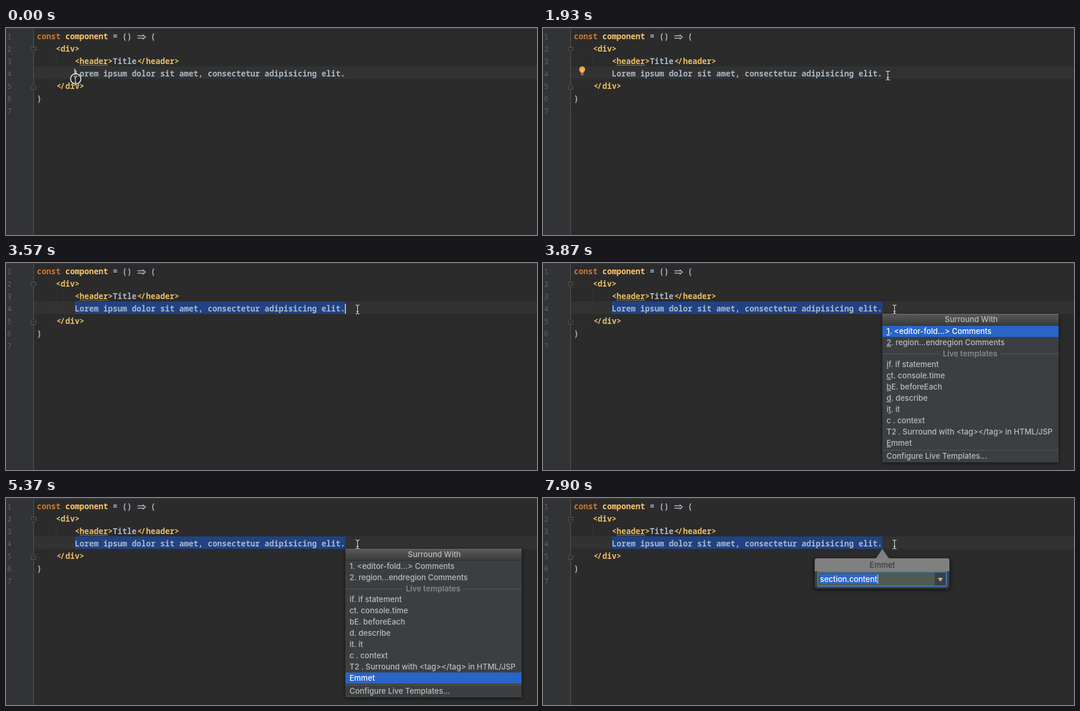
Animation of 895 by 350 pixels, one loop 8000 ms. Source, as an HTML page:

```html
<!DOCTYPE html>
<html lang="en">
<head>
<meta charset="utf-8">
<title>Surround with Emmet</title>
<style>
html, body { margin: 0; width: 100%; height: 100%; overflow: hidden; background: #2b2b2b; }
svg { display: block; }
text { white-space: pre; }
.code { font: 600 13.333px "Noto Sans Mono", monospace; font-variant-ligatures: none; }
.code .number { font-size: 12px; font-weight: 400; }
.code .keyword { font-weight: 800; }
.ui { font: 500 12.95px Inter, sans-serif; }
.keys .key { text-decoration: underline; }
</style>
</head>
<body>
<svg id="stage" width="895" height="350" viewBox="0 0 895 350"></svg>
<script>
const LOOP = 8000, CHAR = 8, LEFT = 52;
const PLAIN = '#a9b7c6', TAG = '#e8bf6a', NAME = '#ffc66d', KEYWORD = '#cc7832';
const $ = id => document.getElementById(id);
const esc = s => s.replace(/&/g, '&amp;').replace(/</g, '&lt;');
const rect = (x, y, w, h, fill, more = '') =>
  `<rect x="${x}" y="${y}" width="${w}" height="${h}" fill="${fill}" ${more}/>`;
const path = (d, stroke, fill = 'none', more = '') =>
  `<path d="${d}" stroke="${stroke}" fill="${fill}" ${more}/>`;
const label = (x, y, s, fill, more = '') => `<text x="${x}" y="${y}" fill="${fill}" ${more}>${esc(s)}</text>`;
const base = row => 19 + 21 * row;
const code = (col, row, s, fill = PLAIN, more = '') => label(LEFT + col * CHAR, base(row), s, fill, more);

// "</" is drawn tightened, like the editor's ligature
const closeTag = (col, row, name) =>
  code(col + .15, row, '<', TAG) + code(col + .9, row, '/', TAG) + code(col + 2, row, name + '>', TAG);

const lorem = 'Lorem ipsum dolor sit amet, consectetur adipisicing elit.';
const lines = ['const component = () => (', '    <div>', '        <header>Title</header>',
  '        ' + lorem, '    </div>', ')', ''];

const dots = lines.map((line, row) => [...line].map((c, i) =>
  c === ' ' ? rect(LEFT + i * CHAR + 3.5, base(row) - 3, 1, 1, '#4c4e50') : '').join('')).join('');

const numbers = lines.map((_, i) => label(2, base(i), String(i + 1), '#606366', 'class="number"')).join('');

const wave = 'M124 64' + 'l2 -2l2 2'.repeat(12);

const editor = `
  ${rect(0, 0, 895, 350, '#2b2b2b')}
  ${rect(0, 0, 46, 350, '#313335')}
  ${rect(47, 65, 848, 21, '#323232')}
  ${rect(0, 0, 895, 1.5, '#393b3c')}
  ${rect(46, 1, 1, 349, '#555555')}
  ${rect(84, 44, 1, 21, '#363636')}
  ${path('M42.5 32.5h8v5l-4 4l-4-4z', '#585b5d', '#2b2b2b')}${path('M44.5 36.5h4', '#585b5d')}
  ${path('M42.5 103.5h8v-5l-4-4l-4 4z', '#585b5d', '#2b2b2b')}${path('M44.5 99.5h4', '#585b5d')}
  ${rect(116, 65, 456, 21, '#214283', 'id="selection"')}
  ${dots}
  <g class="code">
    ${numbers}
    ${code(0, 0, 'const', KEYWORD, 'class="keyword"')}
    ${code(6, 0, 'component', NAME)}${code(16, 0, '=')}${code(18, 0, '()')}${code(24, 0, '(')}
    ${code(4, 1, '<div>', TAG)}
    ${code(8, 2, '<header>', TAG)}${code(16, 2, 'Title')}${closeTag(21, 2, 'header')}
    ${code(8, 3, lorem)}
    ${closeTag(4, 4, 'div')}
    ${code(0, 5, ')')}
  </g>
  ${path('M221.5 13.3h11M221.5 17.3h11M230.5 11.3l4.5 4l-4.5 4', PLAIN, 'none', 'stroke-width="1.5"')}
  ${path(wave, '#9c8d52', 'none', 'stroke-width=".9"')}
  <g id="bulb">
    <path d="M66 65a5 5 0 0 1 3 9l-.8 2h-4.4l-.8-2a5 5 0 0 1 3-9" fill="#f2a83b"/>
    ${path('M64 70l2 2l2-2M66 72v3', '#fbe0ac', 'none', 'stroke-width=".9"')}
    ${rect(63.5, 77, 5, 1.2, '#a9abad')}${rect(64.5, 79, 3, 1, '#a9abad')}
  </g>
  ${rect(115, 69, 1.6, 17, '#d0d0d0', 'id="caret"')}`;

// An underscore marks the letter that follows it as the shortcut key
const items = ['_1. <editor-fold...> Comments', '_2. region...endregion Comments', '',
  '_if. if statement', '_ct. console.time', '_bE. beforeEach', '_d. describe', 'i_t. it',
  'c . context', 'T2 . Surround with <tag></tag> in HTML/JSP', '_Emmet', 'Configure Live Templates...'];
const itemTop = i => i === 11 ? 317 : 106 + 19 * i - (i > 2 ? 1 : 0);

const itemText = items.map((s, i) => `<text class="item" x="579" y="${itemTop(i) + 14}">` +
  esc(s).replace(/_(.)/, '<tspan class="key">$1</tspan>') + '</text>').join('');

const menu = `<g id="menu" class="ui keys">
  ${rect(572, 88, 297, 250, '#000', 'opacity=".55" filter="url(#blur)"')}
  ${rect(572, 86, 297, 251, '#3c3f41')}
  ${rect(572, 86, 297, 19, 'url(#titleBar)')}
  ${rect(572, 86, 297, 1, '#6e6e6e')}
  ${rect(572, 105, 297, 1, '#2e2f30')}
  ${label(722, 100, 'Surround With', '#bbbbbb', 'text-anchor="middle"')}
  ${rect(572, 106, 297, 19, '#2964c8', 'id="row"')}
  ${path('M572 153.5h97M771 153.5h98M572 316.5h297', '#55585a')}
  ${label(720, 158, 'Live templates', '#7f8183', 'text-anchor="middle" font-weight="700"')}
  ${itemText}
</g>`;

const balloon = `<g id="balloon" class="ui">
  ${rect(456, 103, 231, 53, '#000', 'rx="5" opacity=".5" filter="url(#blur)"')}
  ${rect(458, 102, 227, 51, '#3c3f41', 'rx="4"')}
  <path d="M458 124v-18a4 4 0 0 1 4-4h97q3 0 5-4l8-12l8 12q2 4 5 4h96a4 4 0 0 1 4 4v18z" fill="#808080"/>
  ${label(572, 118, 'Emmet', '#393b3d', 'text-anchor="middle"')}
  ${rect(463, 125, 217, 24, '#4f5b50', 'rx="2"')}
  ${rect(660, 126, 20, 22, '#3c3f41')}
  ${rect(463, 125, 217, 24, 'none', 'rx="2" stroke="#3f7cb8" stroke-width="2"')}
  <path d="M665.5 135h8.5l-4.25 6.5z" fill="#b4b6b8"/>
  ${rect(467, 129, 97, 16, '#2f65ca')}
  ${label(467, 142, 'section.content', '#ffffff')}
  ${rect(564, 129, 1, 16, '#d8d8d8', 'id="fieldCaret"')}
</g>`;

const beam = 'M-3.5 -7.5h2l1.5 1.5l1.5-1.5h2M-3.5 7.5h2l1.5-1.5l1.5 1.5h2M0 -6v12M-2 3.5h4';
const mouse = `<g id="mouse">
  <circle id="ring" cx=".5" cy="-3.5" r="8.7" fill="#222" fill-opacity=".6" stroke="#f4f4f4" stroke-width="1.5"/>
  ${path(beam, '#111', 'none', 'stroke-width="2.6"')}
  ${path(beam, '#f4f4f4', 'none', 'stroke-width="1.2"')}
</g>`;

$('stage').innerHTML = `<defs>
  <filter id="blur" x="-10%" y="-20%" width="120%" height="140%"><feGaussianBlur stdDeviation="3"/></filter>
  <linearGradient id="titleBar" x2="0" y2="1"><stop stop-color="#5a5a5a"/><stop offset="1" stop-color="#3a3b3b"/></linearGradient>
</defs>` + editor + menu + balloon + mouse;

const show = (id, on) => $(id).setAttribute('display', on ? 'inline' : 'none');
const within = (t, ...spans) => spans.some(([a, b]) => t >= a && t < b);
const ease = p => p * p * (3 - 2 * p);
const clamp = p => Math.max(0, Math.min(1, p));

// The pointer advances in steps of about 150 ms
function pointer(t) {
  const step = Math.floor((t < 1100 ? t : t + 30) / 150);
  const p = ease(clamp(step / 8)), q = ease(clamp((step - 8) / 6));
  return [117 + 323.5 * p + 152 * q, 89.5 + 14 * p + 10 * Math.sin(Math.PI * p) - 25 * q];
}

function draw(t) {
  const selected = t >= 2220;
  $('mouse').setAttribute('transform', `translate(${pointer(t)})`);
  show('ring', within(t, [0, 150], [2220, 2370]));
  show('bulb', within(t, [600, 2220]));
  show('selection', selected);
  $('caret').setAttribute('x', selected ? 571.2 : 115.2);
  show('caret', within(t, [0, 600], [1180, 1780], [2220, 2970], [3570, 3870]));

  show('menu', within(t, [3870, 6710]));
  const active = t < 5070 ? 0 : t < 5370 ? 11 : 10;
  $('menu').classList.toggle('keys', t < 5070);
  $('row').setAttribute('y', itemTop(active));
  document.querySelectorAll('.item').forEach((el, i) =>
    el.setAttribute('fill', i === active ? '#ffffff' : '#bbbbbb'));

  show('balloon', t >= 6860);
  show('fieldCaret', !within(t, [7310, 7900]));
}

const start = performance.now();
function tick() {
  draw((performance.now() - start) % LOOP);
  requestAnimationFrame(tick);
}
tick();
</script>
</body>
</html>
```
